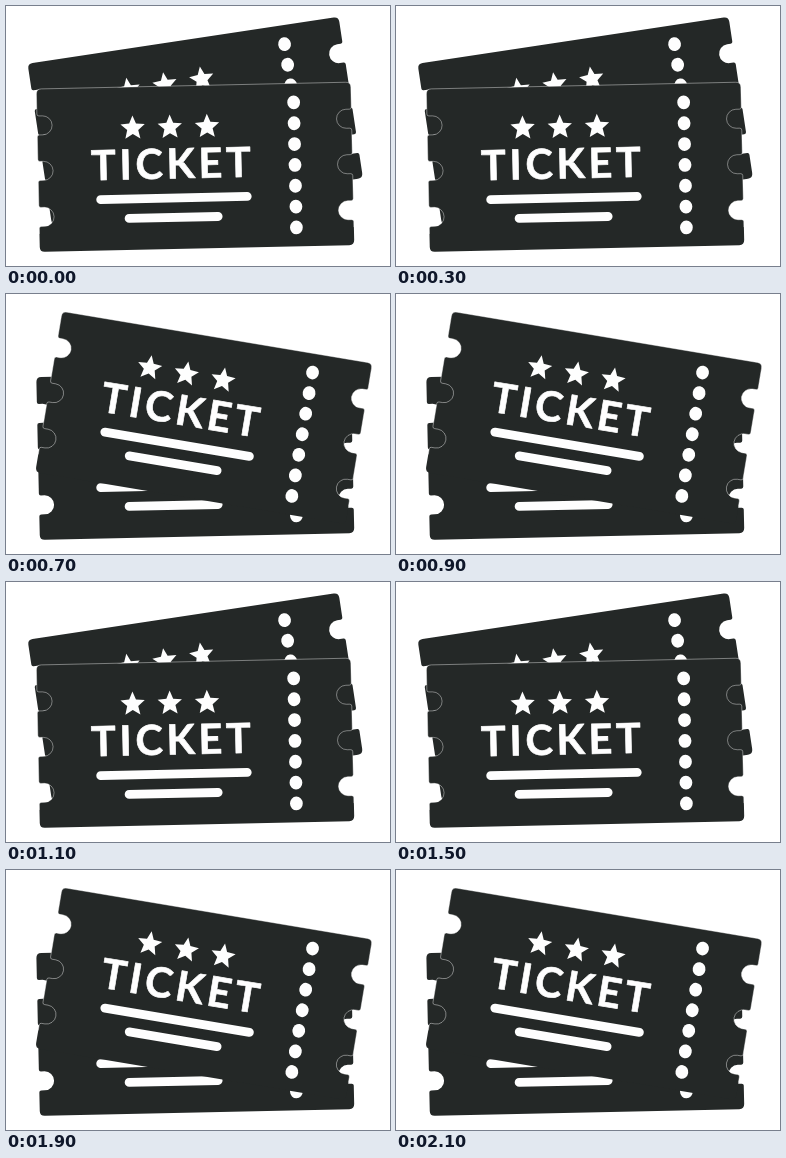
Recreate the animation shown at these times as an HTML page with a canvas. Size 384 px wide and 260 px high, loop 2.3 s.

```html
<!DOCTYPE html>
<html lang="en">
<head>
<meta charset="utf-8">
<title>Tickets</title>
<style>
html, body { margin: 0; width: 100%; height: 100%; overflow: hidden; background: #fff; }
canvas { display: block; }
</style>
</head>
<body>
<canvas id="stage" width="384" height="260"></canvas>
<script>
const ctx = document.getElementById('stage').getContext('2d');
const W = 314.5, H = 163, DARK = '#242827', LIGHT = '#fefefe';
const NOTCHES = [36.5, 82, 128];

// Ticket poses: top-left corner and tilt in degrees
const flat = { x: 30.3, y: 83, tilt: -1.25 };
const upward = { x: 21.6, y: 57.8, tilt: -8.6 };
const downward = { x: 56.2, y: 17.4, tilt: 9.5 };

// One notch on a vertical edge; dir is +1 going down the right side, -1 going up the left
function notch(p, edge, y, dir) {
  const r = 9.5, lip = 2;
  p.lineTo(edge, y - dir * (r + lip));
  p.quadraticCurveTo(edge, y - dir * r, edge - dir * lip, y - dir * r);
  p.lineTo(edge - dir * 5.5, y - dir * r);
  p.arc(edge - dir * 5.5, y, r, -dir * Math.PI / 2, dir * Math.PI / 2, true);
  p.lineTo(edge - dir * lip, y + dir * r);
  p.quadraticCurveTo(edge, y + dir * r, edge, y + dir * (r + lip));
}

function ticketShape() {
  const p = new Path2D(), c = 5;
  p.moveTo(c, 0);
  p.lineTo(W - c, 0);
  p.quadraticCurveTo(W, 0, W, c);
  for (const y of NOTCHES) notch(p, W, y, 1);
  p.lineTo(W, H - c);
  p.quadraticCurveTo(W, H, W - c, H);
  p.lineTo(c, H);
  p.quadraticCurveTo(0, H, 0, H - c);
  for (const y of [...NOTCHES].reverse()) notch(p, 0, y, -1);
  p.lineTo(0, c);
  p.quadraticCurveTo(0, 0, c, 0);
  p.closePath();
  return p;
}

const shape = ticketShape();

function star(x, y) {
  ctx.beginPath();
  for (let i = 0; i < 10; i++) {
    const r = i % 2 ? 5.8 : 12.8;
    const a = (i / 5 - 0.5) * Math.PI;
    ctx.lineTo(x + r * Math.cos(a), y + r * Math.sin(a));
  }
  ctx.fill();
}

function bar(x1, x2, y) {
  ctx.beginPath();
  ctx.moveTo(x1, y);
  ctx.lineTo(x2, y);
  ctx.stroke();
}

function ticket(pose, seam) {
  ctx.save();
  ctx.translate(pose.x, pose.y);
  ctx.rotate(pose.tilt * Math.PI / 180);
  ctx.fillStyle = DARK;
  ctx.fill(shape);

  if (seam) {
    ctx.save();
    ctx.beginPath();
    ctx.rect(-5, -5, W + 10, 150);
    ctx.clip();
    ctx.strokeStyle = 'rgba(255,255,255,.5)';
    ctx.lineWidth = 0.8;
    ctx.stroke(shape);
    ctx.restore();
  }

  ctx.fillStyle = ctx.strokeStyle = LIGHT;
  for (let i = 0; i < 3; i++) star(95.5 + 37.2 * i, 41.3);

  for (let i = 0; i < 7; i++) {
    ctx.beginPath();
    ctx.ellipse(257, 19 + 20.85 * i, 6.4, 6.9, 0, 0, 2 * Math.PI);
    ctx.fill();
  }

  ctx.lineWidth = 8.9;
  ctx.lineCap = ctx.lineJoin = 'round';
  bar(62, 208.5, 112);
  bar(90, 179, 131.4);

  ctx.font = '700 41.5px Lato, "Open Sans", sans-serif';
  ctx.letterSpacing = '3.6px';
  ctx.lineWidth = 0.7;
  ctx.fillText('TICKET', 53, 92.4);
  ctx.strokeText('TICKET', 53, 92.4);
  ctx.restore();
}

// The pair flips every 100 ms from 500 to 900, then holds
function isFlipped(ms) {
  const step = Math.floor((ms % 1200 - 500) / 100);
  return step >= 0 && step < 6 && (step >= 4 || step % 2 === 0);
}

const start = performance.now();

function draw(now) {
  const ms = Math.max(0, now - start) % 2300;
  ctx.fillStyle = '#fff';
  ctx.fillRect(0, 0, 384, 260);
  const pair = isFlipped(ms) ? [flat, downward] : [upward, flat];
  ticket(pair[0], false);
  ticket(pair[1], true);
  requestAnimationFrame(draw);
}
draw(start);
</script>
</body>
</html>
```
